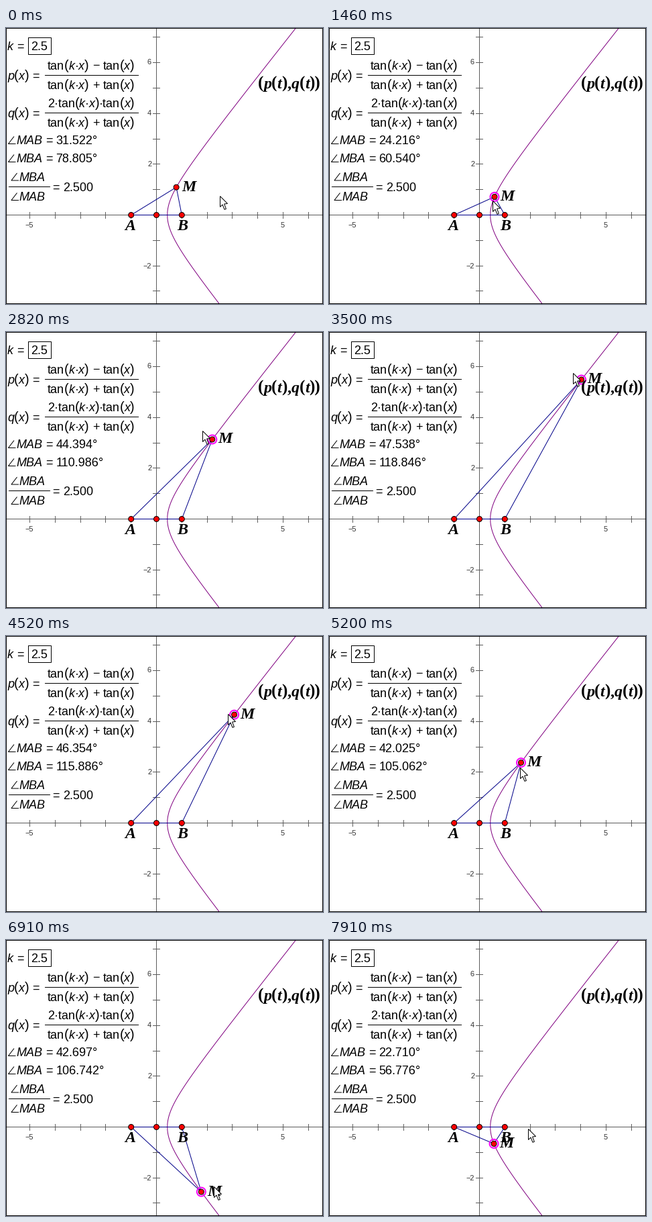
These frames come from a looping animation (473x411 px, 8 s). A matplotlib script:

```python
from itertools import groupby

import numpy as np
import matplotlib.pyplot as plt
from matplotlib.animation import FuncAnimation
from matplotlib.patches import Circle, Polygon, Rectangle

W, H, DPI = 473, 411, 64
PX = 72 / DPI                       # points per pixel
OX, OY, UNIT = 224.5, 278.5, 37.8   # plot origin and scale in pixels
K = 2.5
STEP, LOOP, BEAT = 20, 8000, 339.5  # the drag advances once per beat
GRAB = 3                            # last beat before M is picked up
NAVY, PURPLE, GRAY = "#000088", "#800080", "#5c5c5c"

# Glyph advances in em; all others are .556
SANS = {"t": .278, "(": .333, ")": .333, " ": .278, "k": .5, "x": .5,
        "=": .584, "+": .584, "−": .584, "·": .3, ".": .278,
        "∠": .75, "M": .833, "A": .667, "B": .667}
SERIF = {"p": .5, "q": .5, "t": .278, "(": .333, ")": .333, ",": .25}

# Key moments of the drag: beat, angle MAB, pointer tip
KEYS = np.array([
    (0, 31.522, 319, 250), (1, 31.522, 276, 246), (GRAB, 31.522, 254, 238),
    (5, 24.216, 244, 257), (7, 14.522, 243, 268), (8, 40.627, 266, 188),
    (9, 44.3943, 293, 147), (12, 47.893, 381, 42), (14, 46.3543, 331, 116),
    (18, 16.0009, 260, 272), (21, -42.6969, 310, 367),
    (22, -43.413, 316, 371), (24, -22.7103, 297, 281),
])

plt.rcParams["path.snap"] = False
fig = plt.figure(figsize=(W / DPI, H / DPI), dpi=DPI, facecolor="white")
ax = fig.add_axes([0, 0, 1, 1])
ax.set(xlim=(0, W), ylim=(H, 0))
ax.axis("off")


def locus(deg):
    """Pixel position of the point whose angle at B is K times that at A."""
    a = np.radians(deg)
    d = np.sin((K + 1) * a)
    p = np.sin((K - 1) * a) / d
    q = 2 * np.sin(K * a) * np.sin(a) / d
    return OX + UNIT * p, OY - UNIT * q


def glide(t, ts, vs):
    """Smooth path through the keys that never overshoots them."""
    s = np.diff(vs) / np.diff(ts)
    same = s[:-1] * s[1:] > 0
    total = np.where(same, s[:-1] + s[1:], 1)
    m = np.where(same, 2 * s[:-1] * s[1:] / total, 0)
    m = np.concatenate([s[:1], m, s[-1:]])
    i = np.clip(np.searchsorted(ts, t, side="right") - 1, 0, len(s) - 1)
    h = ts[i + 1] - ts[i]
    u = (t - ts[i]) / h
    ease = u * u * (3 - 2 * u)
    return (vs[i] + (vs[i + 1] - vs[i]) * ease
            + h * u * (1 - u) * (m[i] * (1 - u) - m[i + 1] * u))


def line(xs, ys, color="black", width=1, z=2):
    return ax.plot(xs, ys, color=color, lw=width * PX, zorder=z,
                   solid_capstyle="butt")[0]


def dot(x, y, radius=4, face="#ff0000", edge="black", width=1):
    return ax.add_patch(Circle((x, y), radius, fc=face, ec=edge,
                               lw=width * PX, zorder=4))


def box(x, y, w, h):
    ax.add_patch(Rectangle((x, y), w, h, fill=False, lw=PX, zorder=7))


def text(x, y, s, size=18, font="Liberation Sans", **kw):
    return ax.text(x - 1, y, s, fontsize=size * PX, fontfamily=font,
                   va="baseline", zorder=5, **kw)


def label(x, y, s):
    return text(x, y, s, 24, "Liberation Serif", weight="bold",
                style="italic")


def formula(x, y, s, size=18, paren=20, italic="kxpqMAB", adv=SANS, **kw):
    """Write mixed upright and italic runs; return the end of the line."""
    def kind(c):
        if c in " ∠":
            return c
        return "paren" if c in "()" else "italic" if c in italic else "plain"

    for style, run in groupby(s, kind):
        run = "".join(run)
        em = paren if style == "paren" else size
        if style == "∠":
            line([x + 9.5, x + 1, x + 12], [y - 11.5, y - .5, y - .5], z=5)
        elif style != " ":
            text(x, y, run, em,
                 style="italic" if style == "italic" else "normal", **kw)
        x += em * sum(adv.get(c, .556) for c in run)
    return x


def fraction(x0, x1, y, x, top, bottom):
    line([x0, x1], [y, y])
    formula(x, y - 9, top)
    formula(x, y + 20.5, bottom)


# Axes with unit ticks
line([0, W], [OY, OY], GRAY, z=1)
line([OX, OX], [0, H], GRAY, z=1)
for n in range(-5, 8):
    x, y = np.floor([OX + UNIT * n, OY - UNIT * n]) + .5
    num = f"{n}".replace("-", "−")
    if n < 7:
        line([x, x], [OY - 4.5, OY + 5.5], GRAY, z=1)
    if n > -4:
        line([OX - 5.5, OX + 5.5], [y, y], GRAY, z=1)
    if abs(n) == 5:
        text(x, 297, num, 11, ha="center", color="#303030")
    elif n % 2 == 0 and n and n > -4:
        text(218, y + 3, num, 11, ha="right", color="#303030")

# Curve and its label
line(*locus(np.linspace(-50.4, 50.4, 800)), PURPLE)
formula(377, 90, "(p(t),q(t))", 24, 25, "pqt", SERIF,
        font="Liberation Serif", weight="bold")

# Formulas
formula(3, 33, "k =")
box(33.5, 14.5, 34, 25)
text(38, 33, "2.5")
for y, head, top in ((70.5, "p(x) =", "tan(k·x) − tan(x)"),
                     (126.5, "q(x) =", "2·tan(k·x)·tan(x)")):
    formula(3, y + 6.5, head)
    fraction(58, 198, y, 63, top, "tan(k·x) + tan(x)")
value_a = text(formula(2.5, 173, "∠MAB = "), 173, "")
value_b = text(formula(2.5, 200, "∠MBA = "), 200, "")
fraction(4, 66, 236.5, 7, "∠MBA", "∠MAB")
formula(70.5, 243, "= 2.500")

# Triangle
A, B = OX - UNIT, OX + UNIT
line([A, B], [OY, OY], NAVY, z=3)
sides = line([], [], NAVY, z=3)
for x in (A, OX, B):
    dot(x, OY)
label(A - 8.5, 301, "A")
label(B - 6.5, 301, "B")
point = dot(0, 0)
ring = dot(0, 0, 6.5, "none", "#ff00ff", 2)
name = label(0, 0, "M")

ARROW = np.array([(.5, .5), (.5, 16.5), (4, 13), (7, 20.3), (9.4, 19.3),
                  (6.6, 12), (11.5, 11.5)])
pointer = ax.add_patch(Polygon(ARROW, closed=True, fc="white", ec="black",
                               lw=PX, zorder=6))
box(.5, .5, W - 1, H - 1)

# M is dragged by height; its angle follows from the curve
beats, key_angles, tip_x, tip_y = KEYS.T
key_heights = locus(key_angles)[1]
angles = np.linspace(50, -50, 20000)
heights = locus(angles)[1]


def update(i):
    beat = int((i * STEP + 250) / BEAT)
    deg = np.interp(glide(beat, beats, key_heights), heights, angles)
    x, y = locus(deg)
    sides.set_data([A, x, B], [OY, y, OY])
    point.center = ring.center = x, y
    ring.set_visible(beat > GRAB)
    name.set_position((x + 8.5, y + 5.5))
    value_a.set_text(f"{abs(deg):.3f}°")
    value_b.set_text(f"{abs(deg) * K:.3f}°")
    tip = np.round([glide(beat, beats, tip_x), glide(beat, beats, tip_y)])
    pointer.set_xy(ARROW + tip)
    return sides, point, ring, name, value_a, value_b, pointer


anim = FuncAnimation(fig, update, frames=LOOP // STEP, interval=STEP,
                     repeat=True, repeat_delay=0)
plt.show()
```
